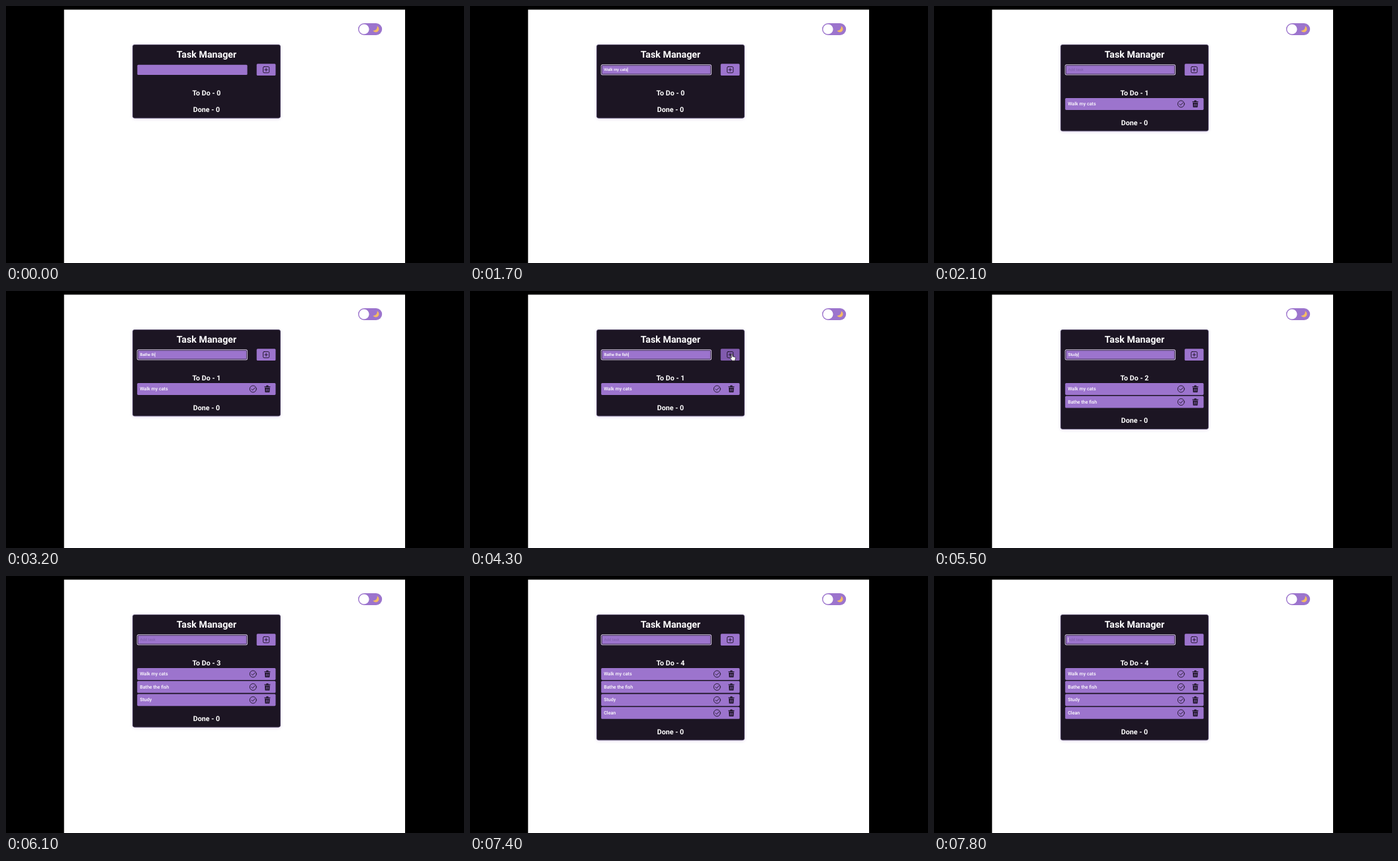
Animation, 692 px wide and 388 px high, one loop 8 s. Source, as an HTML page:

```html
<!DOCTYPE html>
<html lang="en">
<head>
<meta charset="utf-8">
<title>Task Manager</title>
<style>
  html, body { margin: 0; width: 100%; height: 100%; overflow: hidden; background: #000; }
  svg { display: block; width: 692px; height: 388px; text-rendering: geometricPrecision; }
  text { fill: #fff; white-space: pre; }
  .title, .head { font: 700 14.25px Roboto, sans-serif; text-anchor: middle; }
  .head { font-size: 10.7px; }
  .item { font: 500 7.13px Roboto, sans-serif; }
  .typed { font: 5.96px "Liberation Sans", Arial, sans-serif; stroke: #fff; stroke-width: .15; }
  .typed.hint { fill: #3b2a55; fill-opacity: .3; stroke: none; }
  .purple { fill: #9c74cd; }
  .line { fill: none; stroke: #1d1526; stroke-width: .9; stroke-linecap: round; stroke-linejoin: round; }
  #card { fill: #1c1523; stroke: #51456c; stroke-width: .7; filter: drop-shadow(0 1px 2px #a98bd055); }
</style>
</head>
<body>
<svg viewBox="0 0 692 388">
  <defs>
    <g id="row">
      <rect class="purple" x="198.2" width="209.2" height="18" rx="1.6"/>
      <g class="line">
        <circle cx="373.3" cy="9" r="5"/>
        <path d="M370.9 9.1l1.8 1.8 3.3-3.8"/>
      </g>
      <path fill="#1d1526" d="M390.4 5h2.4l.8-1.4h2.5l.8 1.4h2.4v1.3h-8.9zM391 7h7.7l-.5 7.2h-6.7z"/>
      <path stroke="#9c74cd" stroke-width=".6" d="M393.4 8.5v4.3M394.9 8.5v4.3M396.4 8.5v4.3"/>
    </g>
  </defs>
  <rect x="87.7" y="5.5" width="515.3" height="383" fill="#fff"/>

  <rect class="purple" x="532" y="26" width="36.2" height="18" rx="9"/>
  <circle cx="541" cy="35" r="7.6" fill="#fff"/>
  <path fill="#f6bd62" d="M560.6 30.2a4.9 4.9 0 1 1-6.2 6.9a5.5 5.5 0 0 0 6.2-6.9z"/>

  <rect id="card" x="191.4" y="58.4" width="223.2" rx="3"/>
  <text class="title" x="303" y="77.5">Task Manager</text>
  <rect class="purple" x="198.4" y="88.7" width="166.2" height="15.4" rx="1.5"/>
  <g id="focus" fill="none">
    <rect x="198.2" y="88.7" width="166.4" height="15.2" rx="1.8" stroke="#e0d8ea" stroke-width=".9"/>
    <rect x="199.2" y="89.7" width="164.4" height="13.2" rx="1" stroke="#2c2138" stroke-width=".8"/>
    <text id="hint" class="typed hint" x="202.5" y="98.4">Add task</text>
  </g>
  <text id="typed" class="typed" x="202.5" y="98.4"></text>
  <path id="caret" stroke="#fff" stroke-width=".8" d="M0 92.8v7"/>
  <rect id="button" x="378.7" y="87.2" width="28.7" height="17.8" rx="1.6"/>
  <g class="line">
    <rect x="388.5" y="91.6" width="9.2" height="9.2" rx="1.6"/>
    <path d="M390.9 96.2h4.4M393.1 94v4.4"/>
  </g>
  <text id="todo" class="head" x="303" y="135.2"></text>
  <g id="rows"></g>
  <text id="done" class="head" x="303">Done - 0</text>
  <path id="hand" fill="#fff" stroke="#111" stroke-width=".7" stroke-linejoin="round"
    d="M0 0q1-1 1.8 0v3.3l3.6 1q1 .4.8 1.5l-.5 3q-.2.9-1 .9h-3.2q-.7 0-1-.6l-2.8-3.7q.4-1.3 2.3.2z"/>
</svg>
<script>
const $ = id => document.getElementById(id);
const show = (id, on) => $(id).style.display = on ? '' : 'none';
const LOOP = 8000, STEP = 100, PITCH = 19.65, FOCUS = 500, HOVER = 4400;

// Typed evenly between the first and last keystroke, then added to the list.
const tasks = [
  { name: 'Walk my cats', first: 900, last: 1700, added: 2000 },
  { name: 'Bathe the fish', first: 2400, last: 3800, added: 4500 },
  { name: 'Study', first: 5100, last: 5500, added: 5700 },
  { name: 'Clean', first: 6700, last: 7000, added: 7400 }
];

function typedText(t, task) {
  if (!task || t < task.first) return '';
  const progress = (t - task.first) / (task.last - task.first);
  return task.name.slice(0, 1 + Math.floor(progress * (task.name.length - 1)));
}

function drawField(t, text, idle) {
  const blink = idle >= 400 && t % 1400 >= 700 && t % 1400 < 900;
  show('focus', t >= FOCUS);
  show('hint', !text);
  show('caret', text || blink);
  $('typed').textContent = text;
  const width = text ? $('typed').getComputedTextLength() : 0;
  $('caret').setAttribute('transform', `translate(${202.9 + width} 0)`);
}

function drawList(count) {
  const grown = count * PITCH;
  $('todo').textContent = `To Do - ${count}`;
  $('rows').innerHTML = tasks.slice(0, count).map((task, i) =>
    `<g transform="translate(0 ${138.9 + i * PITCH})"><use href="#row"/>
     <text class="item" x="202.2" y="11.3">${task.name}</text></g>`).join('');
  $('done').setAttribute('y', 160.1 + grown);
  $('card').setAttribute('height', 110.8 + grown);
}

// The pointer comes down to the button, rests there and leaves the same way.
function drawHand(t) {
  const away = Math.max(0, Math.abs(t - HOVER) - 200) / 200;
  show('hand', away <= 1);
  $('hand').setAttribute('transform', `translate(${395 + 4 * away} ${95.5 - 49.5 * away})`);
  $('button').setAttribute('fill', away < .5 ? '#815bae' : '#9c74cd');
}

function draw(t) {
  const count = tasks.filter(task => task.added <= t).length;
  const idle = t - (count ? tasks[count - 1].added : 0);
  drawField(t, typedText(t, tasks[count]), idle);
  drawList(count);
  drawHand(t);
}

const start = performance.now();
let shown = -1;
function tick() {
  const t = Math.floor((performance.now() - start) % LOOP / STEP) * STEP;
  if (t !== shown) draw(shown = t);
  requestAnimationFrame(tick);
}
tick();
</script>
</body>
</html>
```
